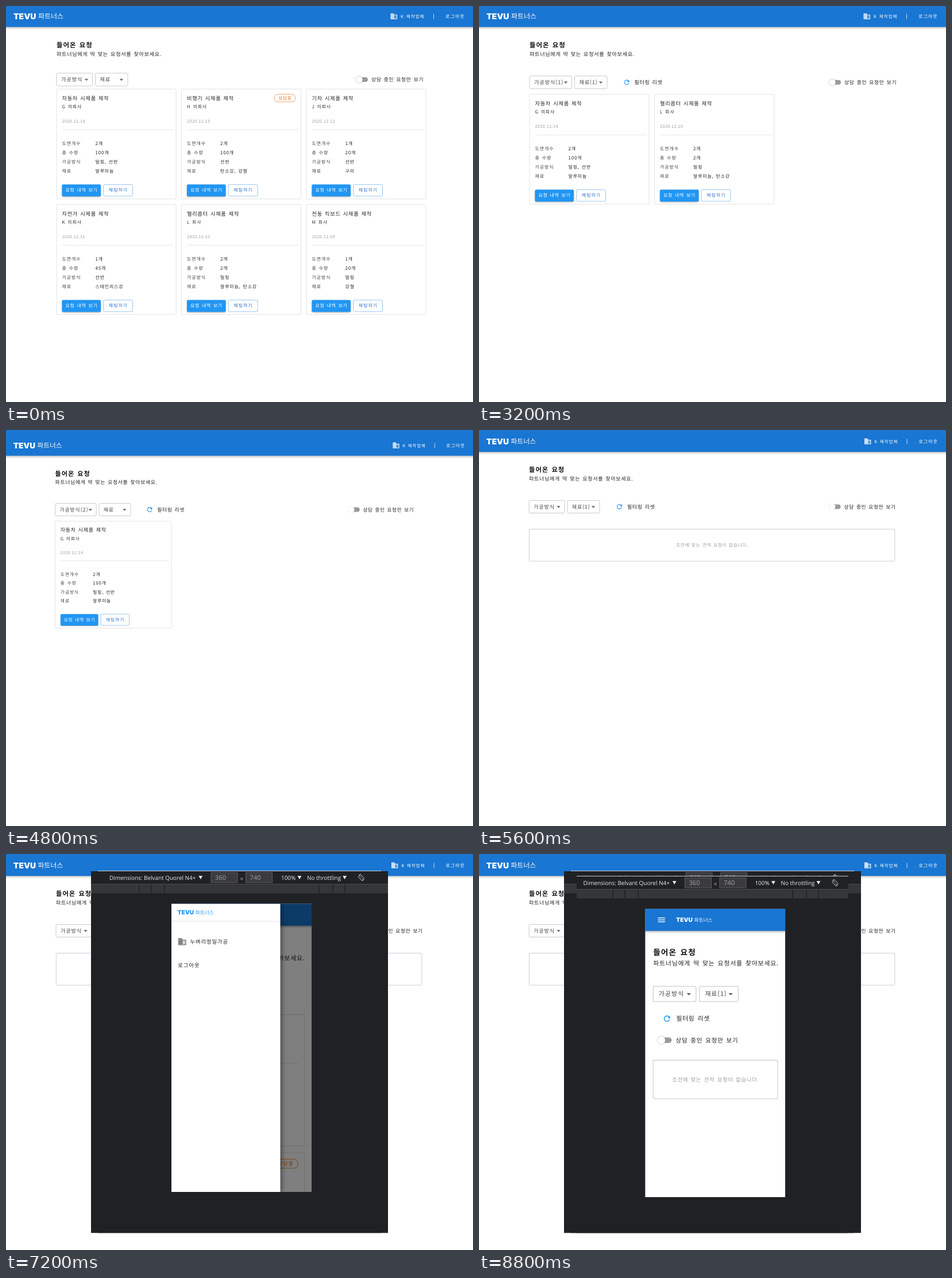
Recreate the animation shown at these times as an HTML page. Size 813x689 px, loop 9600 ms.

```html
<!DOCTYPE html>
<html lang="ko">
<head>
<meta charset="utf-8">
<title>들어온 요청</title>
<style>
  html, body { margin: 0; width: 100%; height: 100%; overflow: hidden; background: #fff; }
  svg { display: block; }
  #stage { width: 100%; height: 100%; }
  text {
    font-family: "Noto Sans CJK KR", "Noto Sans CJK", sans-serif;
    word-spacing: .1em; white-space: pre; text-rendering: geometricPrecision;
  }
  .latin { font-family: "Open Sans", sans-serif; word-spacing: 0; }
  .brand { font-family: Inter, sans-serif; font-weight: 900; }
  .scene { visibility: hidden; animation: show 9.6s step-end infinite; }
  @keyframes show {
    0% { visibility: visible; }
    8.33334%, 100% { visibility: hidden; }
  }
  .bar { fill: #1976d2; filter: drop-shadow(0 1.5px 2px rgba(0,0,0,.4)); }
  .main { fill: #2196f3; filter: drop-shadow(0 1px .8px rgba(0,0,0,.35)); }
  .thumb { filter: drop-shadow(0 .8px .8px rgba(0,0,0,.4)); }
  .menu { fill: #fff; filter: drop-shadow(0 3px 4px rgba(0,0,0,.4)); }
  .drawer { fill: #fff; filter: drop-shadow(2px 0 5px rgba(0,0,0,.5)); }
</style>
</head>
<body>
<svg id="stage" viewBox="0 0 813 689" xmlns="http://www.w3.org/2000/svg"></svg>
<script>
const BUSINESS = 'M12 7V3H2v18h20V7H12zM6 19H4v-2h2v2zm0-4H4v-2h2v2zm0-4H4V9h2v2zm0-4H4V5h2v2zm4 12H8v-2h2v2zm0-4H8v-2h2v2zm0-4H8V9h2v2zm0-4H8V5h2v2zm10 12h-8v-2h2v-2h-2v-2h2v-2h-2V9h8v10zm-2-8h-2v2h2v-2zm0 4h-2v2h2v-2z';
const REFRESH = 'M17.65 6.35C16.2 4.9 14.21 4 12 4c-4.42 0-7.99 3.58-7.99 8s3.57 8 7.99 8c3.73 0 6.84-2.55 7.73-6h-2.08c-.82 2.33-3.04 4-5.65 4-3.31 0-6-2.69-6-6s2.69-6 6-6c1.66 0 3.14.69 4.22 1.78L13 11h7V4l-2.35 2.35z';
const MOBILE = 1.195;

// title, client, drawings, quantity, method, material, in consultation
const jobs = [
  ['자동차 시제품 제작', 'G 의뢰사', 2, 100, '밀링, 선반', '알루미늄'],
  ['비행기 시제품 제작', 'H 의뢰사', 2, 100, '선반', '탄소강, 강철', true],
  ['기차 시제품 제작', 'J 의뢰사', 1, 20, '선반', '구리'],
  ['자전거 시제품 제작', 'K 의뢰사', 1, 45, '선반', '스테인리스강'],
  ['헬리콥터 시제품 제작', 'L 회사', 2, 2, '밀링', '알루미늄, 탄소강'],
  ['전동 킥보드 시제품 제작', 'M 회사', 1, 20, '밀링', '강철']
];

// y is the vertical middle of the line
const text = (x, y, size, str, { ls = 0, fill = '#222', w = 400, mid, cls = '' } = {}) =>
  `<text class="${cls}" x="${x + (mid ? ls / 2 : 0)}" y="${y + size * .37}" font-size="${size}" letter-spacing="${ls}" font-weight="${w}" fill="${fill}"${mid ? ' text-anchor="middle"' : ''}>${str}</text>`;
const rect = (x, y, w, h, fill, more = '') =>
  `<rect x="${x}" y="${y}" width="${w}" height="${h}" fill="${fill}" ${more}/>`;
const frame = (x, y, w, h, stroke, r = 2, sw = .9) =>
  rect(x, y, w, h, 'none', `rx="${r}" stroke="${stroke}" stroke-width="${sw}"`);
const group = (x, y, k, body) => `<g transform="translate(${x} ${y}) scale(${k})">${body}</g>`;
const icon = (x, y, size, d, fill) =>
  group(x - size / 2, y - size / 2, size / 24, `<path d="${d}" fill="${fill}"/>`);
const arrow = (x, y, fill, w = 3.2, h = 1.7) =>
  `<path d="M${x - w} ${y - h}h${2 * w}l${-w} ${2 * h}z" fill="${fill}"/>`;

const brand = (x, y, k, fill) => group(x, y, k,
  text(0, 0, 14, 'TEVU', { fill, cls: 'brand' }) + text(43, 0, 12, '파트너스', { fill, w: 300 }));

function card(x, y, w, i, lineEnd) {
  const [title, client, drawings, qty, method, material, busy] = jobs[i];
  const rows = [['도면개수', drawings + '개'], ['총 수량', qty + '개'], ['가공방식', method], ['재료', material]];
  let s = frame(0, 0, w, 191.2, '#e0e0e0', 1.5)
    + text(9.5, 15.7, 9.2, title, { ls: .73, w: 500 })
    + text(9.5, 31, 7.94, client, { ls: .85, fill: '#333' })
    + text(9.5, 56, 7.2, `2020.12.${String(14 - i).padStart(2, '0')}`, { ls: .45, fill: '#999' })
    + rect(9.5, 70.3, w - lineEnd - 9.5, .7, '#dcdcdc');
  rows.forEach(([name, value], n) => {
    const ry = 95 + n * 15.85;
    s += text(9.5, ry, 7.94, name, { ls: .95, fill: '#444' })
      + text(67.5, ry, 7.94, value, { ls: .85, w: 500 });
  });
  s += rect(9.5, 166, 67.5, 20.7, '', 'class="main" rx="2"')
    + text(43.2, 176, 8, '요청 내역 보기', { ls: .75, fill: '#fff', w: 500, mid: true })
    + frame(81.7, 166.2, 50.8, 20.1, '#90bfee')
    + text(107, 176, 8, '채팅하기', { ls: .95, fill: '#2f74c9', mid: true });
  if (busy) s += frame(w - 46.5, 9, 37, 13.3, '#f2a365', 6.65, 1)
    + text(w - 28, 15.6, 7.7, '상담중', { ls: .7, fill: '#ec7414', w: 500, mid: true });
  return group(x, y, 1, s);
}

function filters(x, y, method, material, open) {
  const grow = method.length > 4 ? 11 : 0, x2 = x + 67.5 + grow, top = y - 11.1;
  return frame(x, top, 62.5 + grow, 22.2, open ? '#1976d2' : '#c4c4c4', 2, open ? 1.6 : .9)
    + text(x + 8, y - .2, 9.1, method, { ls: .95, fill: '#444' })
    + arrow(x + 52 + grow, y + .5, '#666', 3.2, open ? -1.7 : 1.7)
    + frame(x2, top, 56.5, 22.2, '#c4c4c4')
    + text(x2 + 8, y - .2, 9.1, material, { ls: .8, fill: '#444' })
    + arrow(x2 + 45.5, y + .5, '#666');
}

const toggle = (x, y, on) =>
  rect(x - 25.5, y - 4, 19.5, 8, on ? '#8cbae8' : '#9a9a9a', 'rx="4"')
  + `<circle class="thumb" cx="${x - (on ? 11 : 20.8)}" cy="${y}" r="5.6" fill="${on ? '#1976d2' : '#fff'}"/>`
  + text(x, y, 8.8, '상담 중인 요청만 보기', { ls: .7 });

const resetButton = (x, y) =>
  icon(x, y, 13.6, REFRESH, '#2196f3') + text(x + 13.6, y, 9.1, '필터링 리셋', { ls: .6 });

const heading = (x, y) =>
  text(x, y, 11.4, '들어온 요청', { ls: .98, w: 700, fill: '#111' })
  + text(x, y + 16, 9.1, '파트너님에게 딱 맞는 요청서를 찾아보세요.', { ls: .7 });

const empty = (x, y, w) =>
  frame(x, y, w, 56.3, '#c6cacd')
  + text(x + w / 2, y + 28.3, 7.94, '조건에 맞는 견적 요청이 없습니다.', { ls: .55, fill: '#999fa5', mid: true });

function page({ k = 1, dy = 0, list = [], on, reset, method = '가공방식', material = '재료', tx = 0, rx = 246, open }) {
  const fy = 128 + (reset ? 4.8 : 0), cy = 144.5 + (reset ? 9 : 0);
  const body = rect(-20, -30, 900, 66.4, '', 'class="bar"')
    + brand(13, 18, 1, '#fff')
    + heading(88, 68)
    + filters(88, fy, method, material, open)
    + (reset ? resetButton(rx + (method.length > 4 ? 11 : 0), fy) : '')
    + toggle(636 + tx, fy, on)
    + (list.length
      ? list.map((i, n) => card(88 + n % 3 * 217.5, cy + Math.floor(n / 3) * 201, 208, i, 4.5)).join('')
      : empty(88.2, 172.2, 643));
  const account = icon(675.3, 18, 13.6, BUSINESS, '#fff')
    + text(687, 18, 7.6, 'K 제작업체', { ls: .95, fill: '#fff', w: 500 })
    + rect(744, 13.7, .9, 8.8, '#dbe8f7')
    + text(765, 18, 8.1, '로그아웃', { ls: 1, fill: '#fff' });
  return group(0, dy, k, body) + group(813 * (1 - k), dy, k, account);
}

function menu() {
  const item = (y, name) => text(112, y, 8.8, name, { ls: .9 });
  return rect(80, 153.5, 71.5, 68.8, '', 'class="menu" rx="2.5"')
    + rect(80, 158.3, 71.5, 29.6, '#e8f1fa')
    + rect(95, 168, 10.4, 10.4, '#1976d2', 'rx="1.3"')
    + '<path d="M97.2 173.3l2.2 2.2 4-4.4" fill="none" stroke="#fff" stroke-width="1.2"/>'
    + frame(95.6, 198.2, 9.2, 9.2, '#666', 1, 1.2)
    + item(173, '밀링') + item(202.8, '선반');
}

// Device toolbar, ruler and dark canvas between two x limits
function tools(x0, x1, dx, dy) {
  const light = { fill: '#e8eaed', cls: 'latin' }, dim = { fill: '#9aa0a6', cls: 'latin' };
  const box = (x, n) => rect(x, 32.3, 46, 17.6, '#3b3b3d', 'stroke="#606367" stroke-width=".9"')
    + text(x + 7, 41, 11.2, n, dim);
  const ticks = [220, 241, 264, 533, 557, 578].map(x => rect(x, 53, 1.5, 15, '#202124')).join('');
  return rect(x0, 30 + dy, x1 - x0, 629.3 - dy, '#202124')
    + rect(x0, 52 + dy, x1 - x0, 1, '#4b4d51')
    + rect(x0, 53 + dy, x1 - x0, 15.3, '#35363a')
    + group(dx, dy, 1, ticks
      + text(169, 41, 9.95, 'Dimensions: Belvant Quorel N4+', light)
      + text(468, 41, 9.95, '100%', light)
      + text(513, 41, 9.95, 'No throttling', light)
      + [327.8, 500, 578.6].map(x => arrow(x, 41, '#e8eaed', 3.4, 3)).join('')
      + box(346, '360') + box(406.5, '740')
      + text(399.3, 42.5, 11, '×', { ...dim, mid: true })
      + '<g fill="none" stroke="#9aa0a6"><rect x="604.6" y="36.4" width="5.8" height="9.4" rx="1.2" transform="rotate(-45 607.5 41)"/><path d="M602.6 37.4a6 6 0 0 1 4-2.3M612.4 44.6a6 6 0 0 1-4 2.3M603.5 37l8 8"/></g>');
}

function phone(x, y, { filtered, drawer } = {}) {
  const w = 244 / MOBILE, h = 501.5 / MOBILE;
  const lines = [-2.85, 0, 2.85].map(d => rect(18.6, 15.4 + d, 10.4, 1.15, '#fff')).join('');
  let s = rect(0, 0, w, h, '#fff')
    + rect(-10, -10, w + 20, 42, '', 'class="bar"') + lines
    + brand(45.2, 15.9, .725 / MOBILE, '#fff')
    + heading(11.7, 63.4)
    + filters(11.7, 123.8, '가공방식', filtered ? '재료(1)' : '재료');
  s += filtered
    ? resetButton(31.8, 159.8) + toggle(44.6, 191.2) + empty(11.7, 220.2, 181.4)
    : toggle(44.5, 150.6) + card(11.7, 161.6, 182.3, 0, 10) + card(11.7, 362.8, 182.3, 1, 10);
  if (drawer) s += rect(0, 0, w, h, '#000', 'opacity=".5"') + group(0, 0, 1 / MOBILE,
    rect(0, 0, 189.5, 501.5, '', 'class="drawer"')
    + brand(10.5, 15, .725, '#2196f3')
    + rect(0, 30, 189.5, .9, '#dedede')
    + icon(18.8, 66, 16.2, BUSINESS, '#616161')
    + text(32.5, 66, 9.3, '누벼리정밀가공', { ls: .95 })
    + text(11.3, 107.5, 9.3, '로그아웃', { ls: 1 }));
  return `<svg x="${x}" y="${y}" width="244" height="501.5" viewBox="0 0 ${w} ${h}">${s}</svg>`;
}

const edge = (x0, x1, y) => rect(x0, y, x1 - x0, .9, '#d5dae0');
const all = page({ list: [0, 1, 2, 3, 4, 5] });
const none = page({ k: .99, dy: 2, reset: true, material: '재료(1)', tx: 5.9, rx: 247 });
const low = { k: .973, dy: 9.3, reset: true, tx: 2.7 };
const device = none + tools(148, 665, 0, 0);
const shifted = dx => device + edge(160, 653, 29) + tools(160, 653, dx, 0);

const scenes = [
  all,
  all,
  page({ list: [1], on: true }),
  page({ list: [0, 4, 5], reset: true, method: '가공방식(1)' }),
  page({ list: [0, 4], reset: true, method: '가공방식(1)', material: '재료(1)' }),
  page({ ...low, list: [0, 4, 5], open: true }) + menu(),
  page({ ...low, list: [0], method: '가공방식(2)' }),
  none,
  device + phone(277, 86.5),
  shifted(11) + phone(288, 86.5, { drawer: true }),
  shifted(14) + phone(291, 86.5),
  shifted(14) + edge(170, 643, 38) + tools(170, 643, 12.4, 9) + phone(289.2, 95.5, { filtered: true })
];

document.getElementById('stage').innerHTML = scenes.map((s, i) =>
  `<g class="scene" style="animation-delay:${i * 800 - 9600}ms">${s}</g>`).join('');
</script>
</body>
</html>
```
